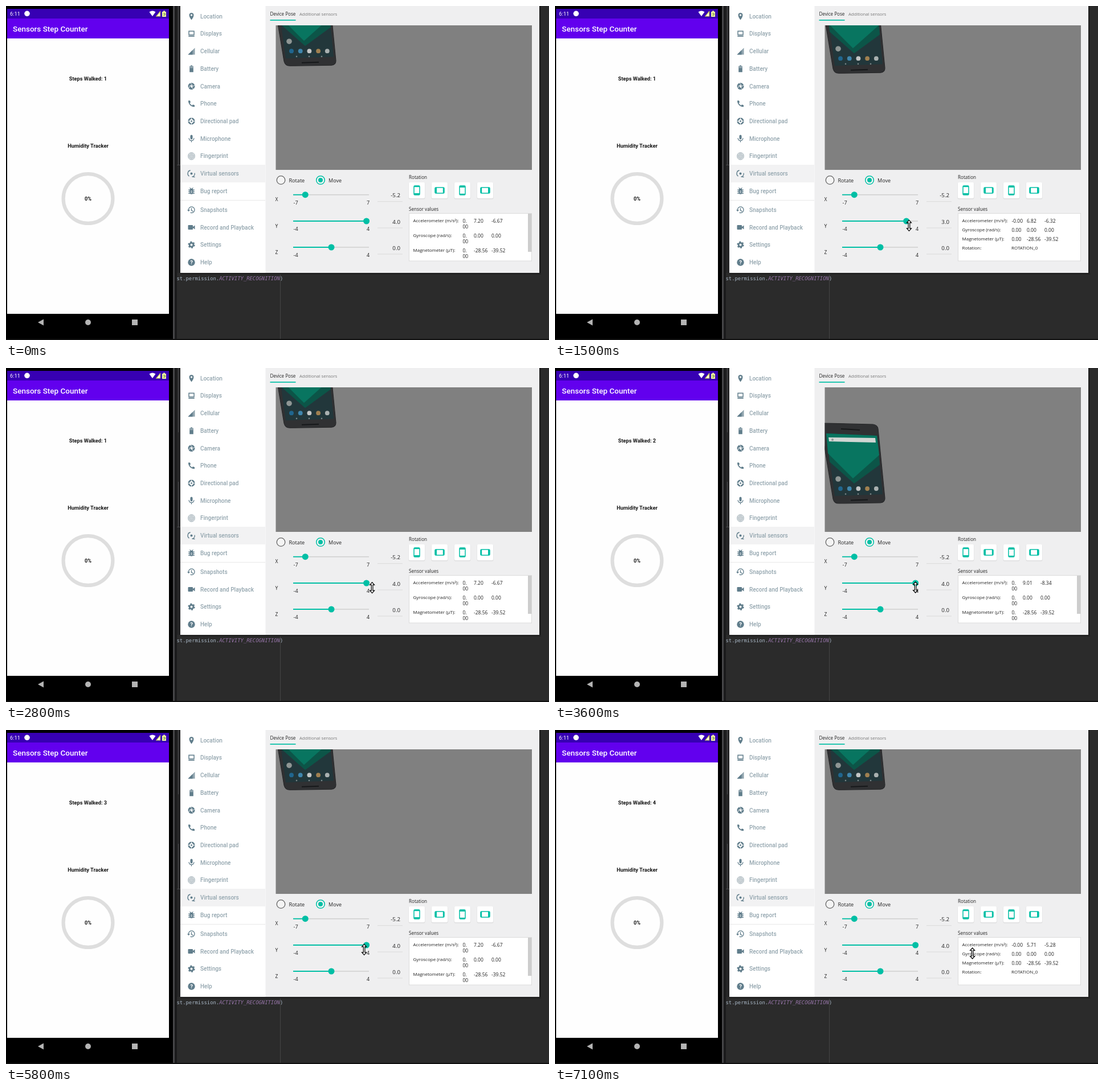
Animation of 953x587 px, one loop 7200 ms. Source, as an HTML page:

```html
<!DOCTYPE html>
<html lang="en">
<head>
<meta charset="utf-8">
<title>Sensors Step Counter</title>
<style>
html, body { margin: 0; width: 100%; height: 100%; overflow: hidden; background: #2b2b2b; }
svg { display: block; }
text { font-family: "Open Sans", sans-serif; white-space: pre; }
.app { font-family: Roboto, sans-serif; }
.code { font-family: "DejaVu Sans Mono", monospace; }
</style>
</head>
<body>
<svg id="stage" width="953" height="587" viewBox="0 0 953 587"></svg>
<script>
const TEAL = '#00bfa5', SLATE = '#607d8b', INK = '#222';

const rect = (x, y, w, h, fill, more = '') =>
  `<rect x="${x}" y="${y}" width="${w}" height="${h}" fill="${fill}" ${more}/>`;
const circle = (x, y, r, fill, more = '') =>
  `<circle cx="${x}" cy="${y}" r="${r}" fill="${fill}" ${more}/>`;
const path = (d, fill, more = '') => `<path d="${d}" fill="${fill}" ${more}/>`;
const stroke = (color, width = 1) => `stroke="${color}" stroke-width="${width}"`;
const line = (d, color, width) => path(d, 'none', stroke(color, width));
// The y given is the middle of the capitals.
const text = (x, y, s, size, fill = INK, more = '') =>
  `<text x="${x}" y="${y + size * .36}" font-size="${size}" fill="${fill}" ${more}>${s}</text>`;
const appText = (x, y, s, size, fill, more = '') => text(x, y, s, size, fill, 'class="app" ' + more);
const boldText = (y, s, size = 9.2) =>
  appText(144, y, s, size, '#161616', 'text-anchor="middle" font-weight="700"');
const group = (id, body = '') => `<g id="${id}">${body}</g>`;
const at = (x, y, body) => `<g transform="translate(${x} ${y})">${body}</g>`;
const loop = (items, draw) => items.map(draw).join('');

function appScreen() {
  return rect(0, 0, 294, 587, '#000') + rect(293, 0, 3, 587, '#464648') + rect(296, 0, 4, 587, '#1b1b1c')
    + rect(2, 5, 284, 17, '#3700b3') + rect(2, 22, 284, 35, '#6200ee') + rect(2, 57, 284, 484, '#fefefe')
    + appText(7, 13.5, '6:11', 9.3, '#fff') + circle(37, 13.3, 4.8, '#fff')
    + path('M251.5 10.5Q257 6.5 262.5 10.5L257 18Z', '#fff')
    + path('M264 18L270.5 10V18Z', '#fff', stroke('#d5d957', 1.2))
    + path('M274 10h2V8.5h3V10h2V19h-7Z', '#eef3a0') + line('M276 13h3v3h-3', '#587d35')
    + appText(12, 40, 'Sensors Step Counter', 13.5, '#fff', 'font-weight="500"')
    + group('steps') + boldText(245.3, 'Humidity Tracker', 9.3)
    + circle(144, 338.5, 43.4, 'none', stroke('#dedede', 6.2)) + boldText(339, '0%')
    + path('M56 556L66 550.5V561.5Z', '#b4b4b4') + circle(144, 556, 5, '#b4b4b4')
    + rect(221, 551, 10, 10, '#b4b4b4') + rect(0, 585, 953, 2, '#111');
}

// Icons are drawn around 0,0.
const menu = {
  'Location': path('M0 6.5C-6 -1-4.5-6 0-6S6-1 0 6.5Z', SLATE) + circle(0, -2, 1.7, '#fff'),
  'Displays': rect(-4.5, -4.5, 9, 6.5, 'none', stroke(SLATE, 1.5)) + rect(-5.2, 3.5, 10.4, 1.7, SLATE),
  'Cellular': path('M-6 6L6-6V6Z', '#90a4ae') + path('M-6 6L2-2V6Z', SLATE),
  'Battery': path('M-3.3-4.5h2V-6h2.6v1.5h2V6h-6.6Z', SLATE) + rect(-3.3, -4.5, 6.6, 3.5, '#90a4ae'),
  'Camera': circle(0, 0, 6, SLATE) + line('M-2-6L2-1M6-2L0 2M4 5L-1 1M-5 4L-2-2', '#fff', .9) + circle(0, 0, 1.8, '#fff'),
  'Phone': path('M-5.5-5.5h3L-1.5-2.5-3-1Q-1 2 1 3L2.5 1.5 5.5 2.5V5.5C-1 6-6 0-5.5-5.5Z', SLATE),
  'Directional pad': circle(0, 0, 4.7, 'none', stroke(SLATE, 2.7)) + line('M0-6V-3M0 6V3M-6 0H-3M6 0H3', '#fff') + circle(0, 0, 1.4, SLATE),
  'Microphone': rect(-2, -6.5, 4, 8, SLATE, 'rx="2"') + line('M-4.5-1Q-4 3.5 0 3.5T4.5-1M0 3V6.5', SLATE, 1.2),
  'Fingerprint': loop([1, 2.6, 4.2, 5.8], r => rect(-r, -r - .5, 2 * r, 2 * r + 1, 'none', `rx="${r}" ` + stroke('#81949e', .8))),
  'Virtual sensors': circle(0, 0, 2, SLATE) + line('M-2-5.5A5.5 5.5 0 0 0-4 4.5M2 5.5A5.5 5.5 0 0 0 5.5-1M-6-4L-2-6M6 6L1 5.5', SLATE, 1.4),
  'Bug report': rect(-3.2, -4.5, 6.4, 10, SLATE, 'rx="3"') + line('M-5.5-2H5.5M-5.5 1H5.5M-5.5 4H5.5M-3-6L-1-4M3-6L1-4', SLATE, 1.2) + line('M-1.3 0H1.3M-1.3 2.5H1.3', '#fff'),
  'Snapshots': line('M-5 1A5.3 5.3 0 1 1-2 4.7M0-3V1L3 2.5', SLATE, 1.3) + path('M-7.5 0h5L-5 3Z', SLATE),
  'Record and Playback': rect(-6, -4, 8.5, 8, SLATE, 'rx="1"') + path('M2-.5L6-3.5V3.5L2 .5Z', SLATE),
  'Settings': circle(0, 0, 3.4, 'none', stroke(SLATE, 2.8)) + circle(0, 0, 5.2, 'none', stroke(SLATE, 2) + ' stroke-dasharray="2.7 2.74"'),
  'Help': circle(0, 0, 6.2, SLATE) + appText(-2.3, 0, '?', 9.5, '#fff', 'font-weight="700"')
};

function sidebar() {
  return rect(306, 0, 149.5, 469, '#fff') + rect(306, 279, 149, 31, '#f2f2f3') + rect(306, 341, 149, 1, '#e8e8e8')
    + loop(Object.entries(menu), ([name, icon], i) => {
      const y = 18 + 30.73 * i + (i > 10 ? 2.3 : 0);
      return at(325.5, y, icon) + appText(341, y, name, 10, '#93a5ae', 'font-weight="500"');
    });
}

// A slider runs from -range to range.
function sliderFrame(name, y, range) {
  return line(`M504 ${y}H637`, '#cfcfcf', 1.4) + text(472.5, y + 8.5, name, 8.5)
    + text(504.5, y + 14, -range, 9) + text(633, y + 14, range, 9) + line(`M652 ${y + 12}H696`, '#dadada');
}

const thumbX = (value, range) => 571 + 61.6 * value / range;

function sliderValue(y, value, range) {
  const x = thumbX(value, range);
  return line(`M504 ${y}H${x}`, TEAL, 1.8) + circle(x, y, 5.5, TEAL)
    + text(692, y + 1.2, value.toFixed(1), 9.7, INK, 'text-anchor="end"');
}

function rotationButton(turn) {
  const icon = rect(-5, -8, 10, 16, 'none', 'rx="1.5" ' + stroke(TEAL, 1.5))
    + rect(-5, -8, 10, 2.2, TEAL) + rect(-5, 5, 10, 3, TEAL);
  return at(721 + 40 * turn, 324, rect(-14.5, -13.5, 29, 29, '#dfdfdf', 'rx="2"')
    + rect(-14, -14, 28, 28, '#fff', 'rx="2"') + `<g transform="rotate(${90 * turn})">${icon}</g>`);
}

function device() {
  return path('M466 97L558 99Q566 100 567 107L579 229Q579 236 571 237L498 238Q490 238 488 230Z', '#303133', stroke('#28292b', 1.2))
    + line('M502 107L535 109', '#17191a', 2) + line('M519 232.5L549 231.5', '#16181a', 2)
    + path('M476 115L565 119L575 222L491 225Z', '#22373b')
    + path('M476 115L565 119L570 170L525 203L482 165Z', '#0c5548')
    + path('M476 115L565 119L569 153L523 194L479 150Z', '#087560')
    + path('M480 122L562 123L563 131L481 129Z', '#d0d6d3') + circle(487, 126, 2, '#8e9a98')
    + circle(497, 195, 4.8, '#8f9694')
    + loop(['#20668f', '#3f86ad', '#c4c6c6', '#a08050', '#a9b0b0'], (color, i) => circle(501 + 15.7 * i, 212, 3.9, color))
    + loop([510, 532, 554], x => circle(x, 221.5, 1.3, '#7d888a'));
}

function panel() {
  return rect(936, 0, 3, 472, '#222') + rect(306, 469, 633, 3, '#222')
    + rect(455, 0, 481, 469, '#efeff0') + sidebar()
    + text(463.5, 14, 'Device Pose', 8.05) + text(515, 14, 'Additional sensors', 7.7, '#777')
    + rect(463.5, 24, 45, 1.7, TEAL) + rect(473.5, 34, 449.5, 254, '#808080')
    + `<g clip-path="url(#view)">${group('device', device())}</g>`
    + circle(482.5, 306, 7.3, '#f4f4f4', stroke('#666', 1.3)) + text(496.5, 307, 'Rotate', 9.1)
    + circle(552, 306, 7.3, '#f4f4f4', stroke(TEAL, 1.5)) + circle(552, 306, 4, TEAL) + text(566, 307, 'Move', 9)
    + sliderFrame('X', 331.7, 7) + sliderFrame('Y', 378, 4) + sliderFrame('Z', 424, 4)
    + sliderValue(331.7, -5.2, 7) + group('ySlider') + sliderValue(424, 0, 4)
    + text(707, 301.5, 'Rotation', 8.1) + loop([0, 1, 2, 3], rotationButton)
    + text(707, 357.5, 'Sensor values', 8.1)
    + rect(707.5, 364.5, 215, 83.5, '#fff', stroke('#dcdcdc')) + group('sensors');
}

// A negative zero keeps the first column on one line.
function sensorTable(y) {
  const below = y < 7.199, shift = below ? 7 : 0;
  const rows = [
    ['Accelerometer (m/s²):', y.toFixed(2), (-y * .9259).toFixed(2)],
    ['Gyroscope (rad/s):', '0.00', '0.00'],
    ['Magnetometer (µT):', '-28.56', '-39.52']
  ];
  return loop(rows, ([label, b, c], i) => {
    const cy = 377.5 + i * (below ? 16 : 26);
    const cell = (x, s, dy = 0) => text(x, cy + dy, s, 8.5);
    return text(714.5, cy, label, 8) + cell(821 + shift, b) + cell(852 + shift, c)
      + (below ? cell(801.5, i ? '0.00' : '-0.00') : cell(801.5, '0.') + cell(801.5, '00', 10));
  }) + (below
    ? text(714.5, 425.5, 'Rotation:', 8) + text(801, 425.5, 'ROTATION_0', 8)
    : rect(916, 365, 6.5, 67, '#cdcdcd'));
}

const cursor = path('M0-9.5L4-5H1.3V5H4L0 9.5L-4 5H-1.3V-5H-4Z', '#fff', stroke('#000', 1.2));

document.getElementById('stage').innerHTML =
  '<defs><clipPath id="view"><rect x="473.5" y="34" width="449.5" height="254"/></clipPath></defs>'
  + rect(0, 0, 953, 587, '#2b2b2b') + rect(300, 0, 6, 469, '#252526')
  + line('M302.5 0V113M302.5 200V279M300 279.5H306', '#4a4a4c') + rect(481, 469, 1, 116, '#444')
  + text(299.5, 479, 'st.permission.<tspan fill="#9876aa" font-style="italic">ACTIVITY_RECOGNITION</tspan>)', 8.87, '#a9b7c6', 'class="code"')
  + appScreen() + panel() + group('cursor', cursor);

const LOOP = 7200, FIRST = 1300, CYCLE = 1550;

function ramp(t, from, to) {
  const u = Math.min(1, Math.max(0, (t - from) / (to - from)));
  return u * u * (3 - 2 * u);
}

// Height from 4 down to 0 and back to 4.
const dip = (t, leave, bottom, rise, top) => 4 * (1 - ramp(t, leave, bottom) + ramp(t, rise, top));

function tween(keys, t) {
  const n = keys.findIndex(k => k[0] > t);
  if (n < 1) return keys.at(n)[1];
  const [[t0, a], [t1, b]] = [keys[n - 1], keys[n]];
  return a + (b - a) * (t - t0) / (t1 - t0);
}

// Acceleration within one drag, and the pointer's distance from the thumb.
const pull = [[0, 7.97], [200, 6.824], [750, 9.01], [1150, 5.706], [1400, 7.2]];
const drift = [[1000, 60], [1300, 4], [2800, 10], [3600, 0], [4400, -22], [5800, -4], [6800, 0], [7100, 100]];

const $ = id => document.getElementById(id);
const move = (id, x, y) => $(id).setAttribute('transform', `translate(${x} ${y})`);
const start = performance.now();
let shown = -1;

function draw() {
  const t = Math.floor((performance.now() - start) % LOOP / 100) * 100;
  if (t !== shown) {
    shown = t;
    const n = Math.floor((t - FIRST) / CYCLE);
    const u = n < 0 ? CYCLE : t - FIRST - n * CYCLE;
    const y = dip(u, 0, 600, 600, 750);
    const offset = tween(drift, t);
    $('ySlider').innerHTML = sliderValue(378, y, 4);
    move('device', 0, -33.2 * dip(u, 80, 700, 750, 1150));
    $('sensors').innerHTML = sensorTable(tween(pull, u));
    $('steps').innerHTML = boldText(127.5, 'Steps Walked: ' + Math.max(1, n + (u >= 700)));
    move('cursor', thumbX(y, 4) + offset, 385.5 + Math.abs(offset) * .07);
    $('cursor').setAttribute('visibility', t < drift[0][0] ? 'hidden' : 'visible');
  }
  requestAnimationFrame(draw);
}
draw();
</script>
</body>
</html>
```
